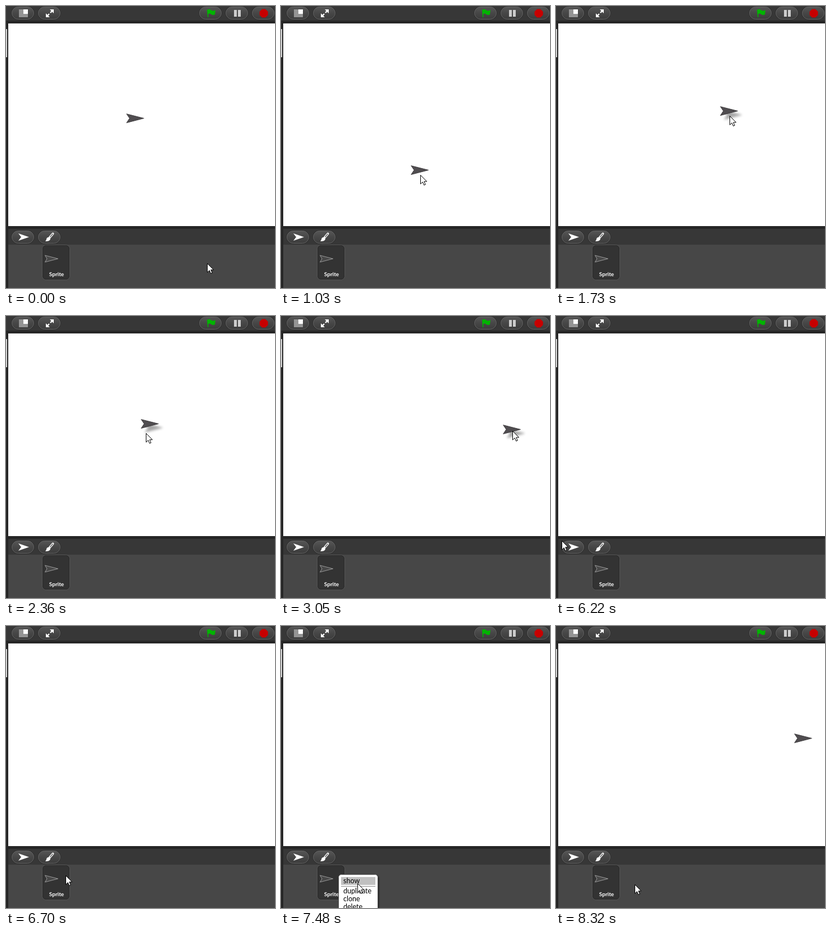
Write an HTML page that moves like this. It is 479 px wide and 501 px high and loops after 8.81 s.

```html
<!DOCTYPE html>
<html lang="en">
<head>
<meta charset="utf-8">
<title>Drag, hide and show a sprite</title>
<style>
  html, body { margin: 0; width: 100%; height: 100%; overflow: hidden; background: #262626; }
  svg { display: block; }
  text { font-family: Lato, "Open Sans", sans-serif; }
  .lifted { filter: drop-shadow(7px 7px 2px rgba(0, 0, 0, .35)); }
  #menu { filter: drop-shadow(2px 2px 1px rgba(0, 0, 0, .4)); }
</style>
</head>
<body>
<svg width="479" height="501" viewBox="0 0 479 501">
  <defs>
    <linearGradient id="face" x2="0" y2="1">
      <stop offset="0" stop-color="#565656"/>
      <stop offset=".5" stop-color="#474747"/>
      <stop offset="1" stop-color="#3c3c3c"/>
    </linearGradient>
    <g id="pill">
      <rect x="-.5" y="-.5" width="41" height="24" rx="12" fill="#252525"/>
      <rect x=".5" y=".5" width="39" height="22" rx="11" fill="url(#face)" stroke="#666"/>
    </g>
  </defs>

  <!-- window panes -->
  <rect width="479" height="26" fill="#373737"/>
  <rect y="41" width="2" height="50" fill="#d4d4d4"/>
  <rect x="4" y="31" width="475" height="360" fill="#fff"/>
  <rect x="4" y="396" width="475" height="28" fill="#373737"/>
  <rect x="4" y="424" width="475" height="77" fill="#474747"/>

  <!-- buttons -->
  <use href="#pill" x="10" y="1"/>
  <use href="#pill" x="57" y="1"/>
  <use href="#pill" x="344" y="1"/>
  <use href="#pill" x="391" y="1"/>
  <use href="#pill" x="438" y="1"/>
  <use href="#pill" x="10" y="399"/>
  <use href="#pill" x="57" y="399"/>
  <path d="M23 6h16v14h-16z" fill="#949494"/>
  <path d="M31 6h8v8h-8z" fill="#fff"/>
  <path d="M78 6h7v7zM71 13v7h7z" fill="#fff"/>
  <path d="M83 8l-4 4M73 18l4-4" stroke="#fff" stroke-width="2.4"/>
  <path d="M358 7q4-3 7 0t8 0l-1 8q-4 2-7-.5t-5 .5l.5 5h-1.500z" fill="#00b400"/>
  <path d="M406 7h5v12h-5zM413 7h5v12h-5z" fill="#ccc"/>
  <path d="M456 5.500h6l4.500 4.500v6l-4.500 4.500h-6l-4.500-4.500v-6z" fill="#c80000"/>
  <path d="M22 404l19 6.500-19 6.500 5-6.500z" fill="#fff"/>
  <path d="M83.500 404.500l-6 7" stroke="#fff" stroke-width="4" stroke-linecap="round"/>
  <path d="M83.500 404.500l-5 6" stroke="#555" stroke-width="1.200"/>
  <path d="M74.500 411q4 0 4.500 3.500-2 4-9 3.500 2-2 2-4 .5-2.500 2.500-3z" fill="#fff"/>

  <!-- sprite tile -->
  <rect x="64.500" y="424.500" width="49" height="62" rx="7" fill="#333" stroke="#585858"/>
  <rect x="65.500" y="425.500" width="47" height="60" rx="6" fill="none" stroke="#282828"/>
  <path d="M69.500 443l23 6-23 6 3.500-6z" fill="#484848" stroke="#b0b0b0" stroke-width=".8"/>
  <text x="90" y="480" font-size="10" font-weight="700" fill="#fff" text-anchor="middle">Sprite</text>

  <path id="sprite" d="M.7 .7L31.500 8.500 .7 16.500 6 8.500z" fill="#504d50" stroke="#373537" stroke-width=".9"/>

  <g id="menu">
    <rect x="102.500" y="441.500" width="70" height="110" rx="5" fill="#fff" stroke="#4c4c4c"/>
    <rect id="choice" x="107" y="446" width="61" height="14"/>
    <path d="M107 462.500h61" stroke="#888"/>
    <g font-size="12.500">
      <text x="111" y="457">show</text>
      <text x="111" y="475">duplicate</text>
      <text x="111" y="489">clone</text>
      <text x="111" y="503">delete</text>
    </g>
  </g>

  <path id="cursor" d="M.5 .5V16.200L4.200 12.700 6.700 18.300 9.200 17.200 6.800 11.800H11.700z" fill="#fff" stroke="#000"/>
</svg>
<script>
const LOOP = 8810;
const [sprite, menu, choice, cursor] =
  ['sprite', 'menu', 'choice', 'cursor'].map(id => document.getElementById(id));

// Each path point is [step, x, y]. A drag moves the sprite, with the cursor held
// at `grip` from its corner and leading by `lead` in mid-move.
const moves = [
  { from: 70, to: 420, path: [[0, 358, 457], [4, 208, 222], [5, 231, 208]] },
  { from: 570, to: 1030, grip: [17, 17],
    path: [[0, 214, 191], [1, 212, 193], [4, 197, 248], [7, 231, 283]] },
  { from: 1350, to: 1890, grip: [17, 17],
    path: [[0, 231, 283], [3, 260, 222], [5, 292, 178], [8, 329, 149]] },
  { from: 2190, to: 2670, grip: [17, 11], lead: [-8, 14],
    path: [[0, 329, 149], [3, 240, 183], [7, 212, 217]] },
  { from: 2900, to: 3280, grip: [17, 11],
    path: [[0, 212, 217], [3, 395, 193], [6, 434, 191]] },
  { from: 3600, to: 3890, path: [[0, 453, 202], [1, 463, 208], [3, 330, 242], [4, 164, 261], [5, -40, 270]] },
  { from: 6220, to: 6700, path: [[0, -20, 385], [1, 10, 399], [7, 106, 443]] },
  { from: 7250, to: 7560, path: [[0, 106, 443], [5, 140, 459]] },
];

// Cubic curve through the points, at rest at both ends.
function along(path, step) {
  const k = Math.max(1, path.findIndex(p => p[0] >= step));
  const a = path[k - 1], b = path[k];
  const span = b[0] - a[0], u = (step - a[0]) / span;
  const slope = (i, axis) => {
    const before = path[i - 1], after = path[i + 1];
    return before && after ? (after[axis] - before[axis]) / (after[0] - before[0]) * span : 0;
  };
  return [1, 2].map(axis =>
    a[axis] + (b[axis] - a[axis]) * u * u * (3 - 2 * u)
    + slope(k - 1, axis) * u * (1 - u) ** 2
    - slope(k, axis) * u * u * (1 - u));
}

function pose(t) {
  let hand = [358, 457], body = [214, 191], lifted = false;
  for (const { from, to, path, grip, lead = [0, 0] } of moves) {
    if (t < from) break;
    const last = path[path.length - 1][0];
    const gap = (to - from) / (last - 1);
    const step = Math.min(last, 1 + Math.floor((t - from) / gap + .05));
    const spot = along(path, step);
    if (grip) {
      const bump = Math.sin(Math.PI * step / last);
      body = spot;
      hand = spot.map((v, i) => v + grip[i] + lead[i] * bump);
      lifted = step < last;
    } else hand = spot;
  }
  if (t >= 3430) body = [436, 191];
  if (t >= 8320) body = [424, 191];
  return { hand, body, lifted };
}

const place = (el, p) => el.setAttribute('transform', `translate(${p.map(Math.round)})`);
const show = (el, on) => el.setAttribute('visibility', on ? 'visible' : 'hidden');

function draw(now) {
  const t = now % LOOP;
  const { hand, body, lifted } = pose(t);
  place(cursor, hand);
  place(sprite, body);
  sprite.classList.toggle('lifted', lifted);
  show(sprite, t < 4750 || t >= 8320);
  show(menu, t >= 6930 && t < 8320);
  choice.setAttribute('fill', t >= 8170 ? '#808080' : t >= 7250 ? '#c0c0c0' : '#fff');
}

const start = performance.now();
function tick() {
  draw(performance.now() - start);
  requestAnimationFrame(tick);
}
tick();
</script>
</body>
</html>
```
